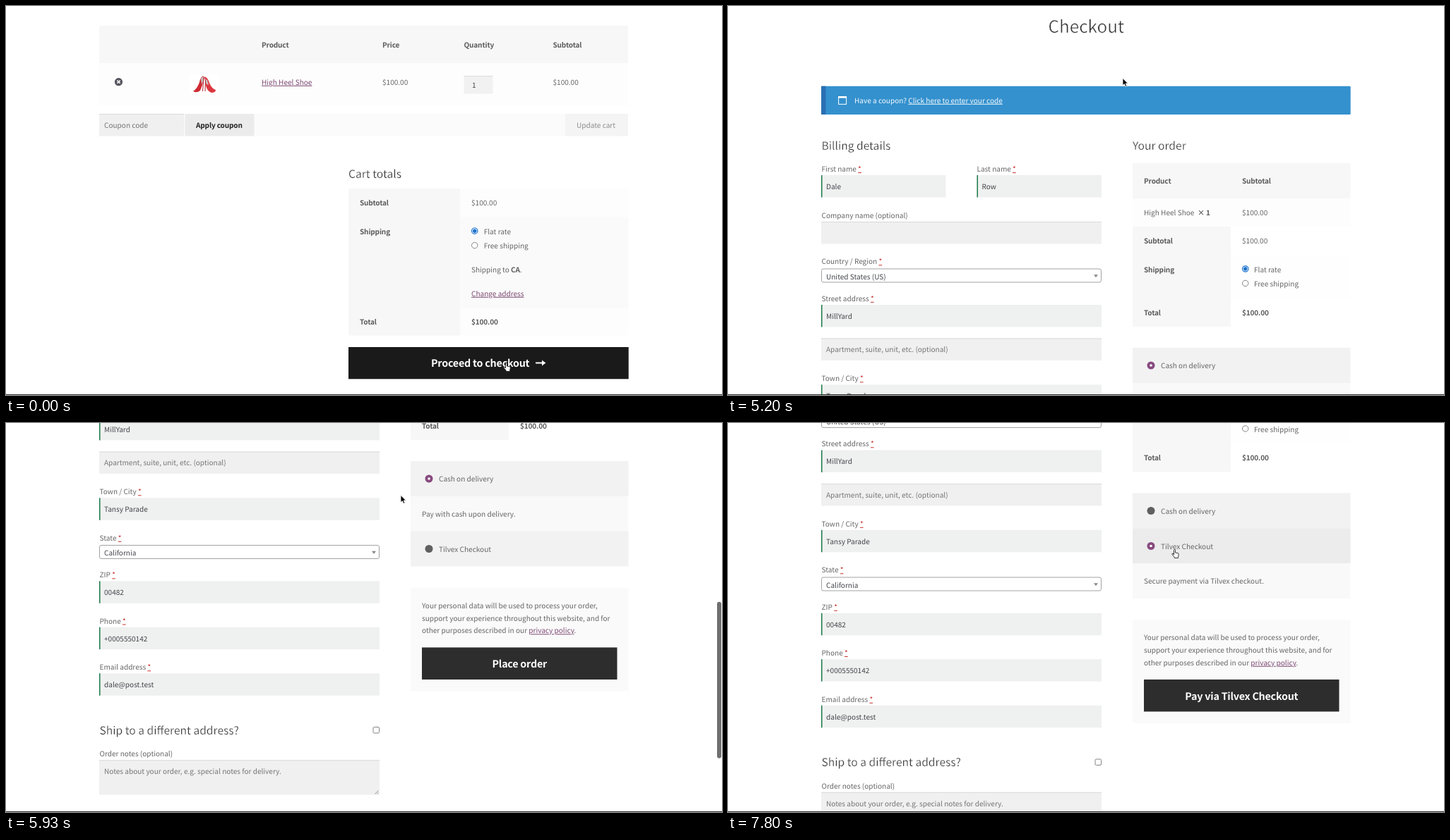
An HTML page that plays this animation: 1014 px wide and 552 px high, repeating every 8 s.

```html
<!DOCTYPE html>
<html lang="en">
<head>
<meta charset="utf-8">
<title>Checkout</title>
<style>
html, body { margin: 0; width: 100%; height: 100%; overflow: hidden; background: #fff; }
#stage { display: block; width: 1014px; height: 552px; }
text {
  font: 400 10.05px "Noto Sans CJK SC", "Noto Sans CJK JP", "Noto Sans CJK TC", "Noto Sans CJK KR", "Noto Sans", sans-serif;
  fill: #666; white-space: pre; text-rendering: geometricPrecision;
}
.b { font-weight: 700; letter-spacing: -.015em; fill: #5c5c5c; }
.dark { fill: #222; }
.off { fill: #8c8c8c; }
.in { fill: #43454b; }
.ph { fill: #757575; }
.white { fill: #f4f9fd; }
.link { fill: #7d4a74; text-decoration: underline; }
.req { fill: #c8322d; text-decoration: underline dotted; }
.h { font-size: 15.6px; fill: #333; stroke: #fff; stroke-width: .3px; }
.title { font-size: 24.3px; fill: #333; stroke: #fff; stroke-width: .5px; text-anchor: middle; }
.btn { font-size: 14.3px; font-weight: 700; letter-spacing: -.015em; fill: #fff; }
.mid { text-anchor: middle; }
</style>
</head>
<body>
<svg id="stage" viewBox="0 0 1014 552"></svg>
<script>
const $ = id => document.getElementById(id);
const set = (id, attrs) => { for (const a in attrs) $(id).setAttribute(a, attrs[a]); };

// Markup helpers; text is placed by the middle of its capitals
const rect = (x, y, w, h, fill, more = '') =>
  `<rect x="${x}" y="${y}" width="${w}" height="${h}" fill="${fill}" ${more}/>`;
const circle = (x, y, r, fill, more = '') => `<circle cx="${x}" cy="${y}" r="${r}" fill="${fill}" ${more}/>`;
const path = (d, fill, more = '') => `<path d="${d}" fill="${fill}" ${more}/>`;
const drop = { h: 5.8, title: 9.4, btn: 5.2 };
const text = (x, y, s, cls = '', more = '') =>
  `<text x="${x}" y="${y + (drop[cls.split(' ')[0]] || 3.8)}" class="${cls}" ${more}>${s}</text>`;
const span = (cls, s) => `<tspan class="${cls}">${s}</tspan>`;

const label = (x, y, s, need = true) => text(x, y, s + (need ? ' ' + span('req', '*') : ''));
const filled = (x, y, w, s) =>
  rect(x, y, w, 31.5, '#eff1f0') + rect(x, y, 1.5, 31.5, '#1b7a4b') + text(x + 7, y + 16, s, 'in');
const blank = (x, y, w, h, s) =>
  rect(x, y, w, h, '#f0f0f0') + rect(x, y, w, 1, '#dadada') + text(x + 7, y + 16, s, 'ph');
const select = (y, s) =>
  rect(132.5, y, 396, 19, '#fff', 'stroke="#a2a2a2" rx="2.5"') + text(139, y + 10.8, s, 'in') +
  path(`M518 ${y + 8.2}h6l-3 4z`, '#888');
const radios = (x, y, gap) =>
  circle(x, y, 4.2, '#fff', 'stroke="#1c72cf" stroke-width="1.2"') + circle(x, y, 2.7, '#1c72cf') +
  circle(x, y + 20.5, 4.2, '#fff', 'stroke="#767676" stroke-width=".9"') +
  text(x + gap, y + .8, 'Flat rate') + text(x + gap, y + 21.3, 'Free shipping');
const option = (id, y, s) =>
  rect(573, y, 308.5, 50, '#f2f2f2', `id="${id}Row"`) + circle(599, y + 25, 5.5, '#606060', `id="${id}Ring"`) +
  circle(599, y + 25, 1.8, '#fff', `id="${id}Dot"`) + text(613, y + 25.2, s);
const fold = (id, s) =>
  `<svg id="${id}" x="573" y="542" width="308.5" height="49.5">${rect(0, 0, 308.5, 50, '#f9f9f9')}${text(16, 25, s)}</svg>`;

const price = '$100.00';

const shoes =
  path('M265 121Q271 117 274 108Q275 102 279 99L281 102Q278 113 275 120Q270 124 265 121Z', '#cf2a33') +
  path('M281 100Q286 102 288 109Q291 117 297 119Q297 123 291 123Q285 121 283 113Z', '#dc3840') +
  path('M276 103L279 100 281 104 277 111ZM282 104L285 105 287 112 284 111Z', '#c9c3c2') +
  path('M280 101L278.5 121M282.5 105L282 121', 'none', 'stroke="#b4232c" stroke-width="1"');

const cart =
  rect(132, 28, 749, 53.5, '#f7f7f7') + rect(132, 81.5, 749, 59.5, '#fdfdfd') + rect(132, 153, 749, 31.5, '#fbfbfb') +
  text(362, 55, 'Product', 'b') + text(533, 55, 'Price', 'b') + text(648.5, 55, 'Quantity', 'b') + text(774.5, 55, 'Subtotal', 'b') +
  circle(159.5, 107.7, 5.6, '#57565f') +
  path('M157.4 105.6l4.2 4.2m0-4.2l-4.2 4.2', 'none', 'stroke="#fff" stroke-width="1.5"') +
  rect(259, 97, 43, 28, '#fff') + shoes +
  text(362, 108, 'High Heel Shoe', 'link') + text(533, 108, price) + text(774.5, 108, price) +
  rect(648.5, 99, 41, 25.5, '#f1f1f1') + rect(648.5, 99, 41, 1, '#dcdcdc') + text(660, 112, '1', 'in') +
  blank(132, 153, 120, 31.5, 'Coupon code') +
  rect(253.5, 153, 98, 31.5, '#ebebeb') + text(269, 169, 'Apply coupon', 'b dark') +
  rect(792, 153, 89, 31.5, '#f4f4f4') + text(808, 169, 'Update cart', 'off') +
  text(485, 238, 'Cart totals', 'h') +
  rect(485, 259, 158.5, 208.5, '#f7f7f7') + rect(643.5, 259, 238, 208.5, '#fdfdfd') + rect(643.5, 300, 238, 128.5, '#fafafa') +
  text(501, 279.5, 'Subtotal', 'b') + text(659, 279.5, price) +
  text(501, 320, 'Shipping', 'b') + radios(663.7, 319.2, 13) +
  text(659, 374, `Shipping to ${span('b', 'CA')}.`) + text(659, 408, 'Change address', 'link') +
  text(501, 448, 'Total', 'b') + text(659, 448, price, 'b') +
  rect(483.7, 482.2, 399.6, 48.6, '#fff', 'id="focus" stroke="#83457a" stroke-width="1.4"') +
  rect(485, 484, 396.7, 45.3, '#1a1a1a') + text(602, 507, 'Proceed to checkout', 'btn') +
  path('M750 505.5h9v-3l5.5 4-5.5 4v-3h-9z', '#fff');

const billing =
  text(132.5, 205, 'Billing details', 'h') +
  label(132.5, 238.3, 'First name') + filled(132, 247, 176.5, 'Dale') +
  label(352.5, 238.3, 'Last name') + filled(352.5, 247, 176.5, 'Row') +
  label(132.5, 304, 'Company name (optional)', false) + blank(132, 313, 397, 31.5, '') +
  label(132.5, 369.5, 'Country / Region') + select(380, 'United States (US)') +
  label(132.5, 422, 'Street address') + filled(132, 431, 397, 'MillYard') +
  blank(132, 478.5, 397, 31.5, 'Apartment, suite, unit, etc. (optional)') +
  label(132.5, 535.5, 'Town / City') + filled(132, 544.3, 397, 'Tansy Parade') +
  label(132.5, 601, 'State') + select(611.5, 'California') +
  label(132.5, 653.5, 'ZIP') + filled(132, 662.3, 397, '00482') +
  label(132.5, 718.7, 'Phone') + filled(132, 727.7, 397, '+0005550142') +
  label(132.5, 784.5, 'Email address') + filled(132, 793.3, 397, 'dale@post.test') +
  text(132.5, 874, 'Ship to a different address?', 'h') +
  rect(520, 869.5, 8.5, 8.5, '#fff', 'stroke="#767676" stroke-width=".9" rx="1.5"') +
  label(132.5, 907.5, 'Order notes (optional)', false) +
  blank(132, 916.3, 397, 49.2, 'Notes about your order, e.g. special notes for delivery.') +
  path('M522.5 964.5l5-5m-2 5l2-2', 'none', 'stroke="#777" stroke-width=".8"');

const order =
  text(573, 205, 'Your order', 'h') +
  rect(573, 230, 308.5, 50, '#f7f7f7') + rect(573, 280, 308.5, 40, '#fdfdfd') +
  rect(573, 320, 139, 142, '#f7f7f7') + rect(712, 360, 169.5, 61.5, '#fefefe') +
  text(589, 255, 'Product', 'b') + text(728, 255, 'Subtotal', 'b') +
  text(589, 300, 'High Heel Shoe') + text(665, 300, '× 1', 'b') + text(728, 300, price) +
  text(589, 340.5, 'Subtotal', 'b') + text(728, 340.5, price) +
  text(589, 381, 'Shipping', 'b') + radios(732.7, 380, 12.3) +
  text(589, 442, 'Total', 'b') + text(728, 442, price, 'b') +
  option('cash', 492, 'Cash on delivery') + fold('cashNote', 'Pay with cash upon delivery.') +
  `<g id="card">${option('card', 591.5, 'Tilvex Checkout')}</g>` + fold('cardNote', 'Secure payment via Tilvex checkout.') +
  rect(573, 672, 308.5, 146.5, '#fafafa') +
  text(589, 697, 'Your personal data will be used to process your order,') +
  text(589, 714.7, 'support your experience throughout this website, and for') +
  text(589, 732.5, `other purposes described in our ${span('link', 'privacy policy')}.`) +
  rect(589, 756.5, 276.5, 45.5, '#2d2d2d') + text(727.3, 779.8, '', 'btn mid', 'id="pay"');

const checkout =
  text(507.3, 36, 'Checkout', 'title') +
  rect(132, 120.7, 749.7, 40.3, '#3491ce', 'rx="1.5"') + rect(132, 120.7, 6.5, 40.3, '#2b70b3') +
  rect(156.6, 135.8, 11, 10.6, 'none', 'stroke="#fff" stroke-width="1"') + rect(156.2, 135, 11.8, 2.6, '#fff') +
  text(179, 141, `Have a coupon? <tspan text-decoration="underline">Click here to enter your code</tspan>`, 'white') +
  billing + order;

$('stage').innerHTML =
  `<g id="cart">${cart}</g>` +
  `<g id="checkout"><g id="page">${checkout}</g>${rect(1007, 84, 6, 222, '#6f6f6f', 'id="bar" rx="3"')}</g>` +
  rect(0, 551, 1014, 1, '#2e2e2e') +
  `<g id="cursor">` +
  path('M0 0V10.2L2.3 8.1 4 11.8 5.8 11 4.2 7.4H7.4Z', '#000', 'id="arrow" stroke="#fff" stroke-width=".8"') +
  path('M-1 7.5V1a1 1 0 0 1 2 0V4.5L4.6 5.2Q6 5.6 5.8 7L5 11V12H-.2V11L-3.6 6.8Q-3.8 5.2-2.4 5.6Z', '#fff',
    'id="hand" stroke="#222" stroke-width=".9" stroke-linejoin="round"') + `</g>`;

// Keys are [tick, ...values], at 15 ticks per second
const mouse = [[0, 708.5, 506.5], [8, 708.5, 506.5], [12, 691, 512], [15, 691, 512], [18, 696, 513],
  [51, 696, 513], [52, 941.5, 241.5], [55, 941.5, 241.5], [60, 770, 176], [66, 559, 102.5], [90, 559, 102.5],
  [98, 629.5, 182], [101, 647, 183], [103, 652, 181.5], [104, 652, 181.5], [107, 632.5, 179.5]];
const scroll = [[77, 0], [78, 7], [79, 40], [80, 100], [81, 165], [82, 230], [83, 292], [84, 346],
  [85, 389], [86, 412], [87, 427], [89, 438], [91, 442]];
const barFade = [[55, 1], [59, 0], [78, 0], [79, 1], [100, 1], [103, 0]];

function at(keys, n) {
  const i = keys.findIndex(k => k[0] > n);
  if (i < 1) return keys.at(i).slice(1);
  const a = keys[i - 1], b = keys[i], p = (n - a[0]) / (b[0] - a[0]);
  return a.slice(1).map((v, j) => v + (b[j + 1] - v) * p);
}
const show = (id, on) => $(id).style.display = on ? '' : 'none';

function draw(ms) {
  const n = Math.floor((ms % 8000 + 4) * .015);
  const second = n >= 52, over = n >= 95, paid = n >= 113;
  show('cart', !second);
  show('checkout', second);
  show('focus', n >= 23);
  show('hand', !second || over);
  show('arrow', second && !over);
  const [x, y] = at(mouse, n);
  set('cursor', { transform: `translate(${x} ${y})` });

  const p = Math.min(1, Math.max(0, (n - 112.4) / 4.4));
  const slide = 49.5 * (.5 - .5 * Math.cos(Math.PI * p));
  const top = at(scroll, n)[0] - slide;
  set('page', { transform: `translate(0 ${-top})` });
  set('bar', { y: 84 + top * .3875, opacity: at(barFade, n)[0] });
  set('cashNote', { height: 49.5 - slide });
  set('card', { transform: `translate(0 ${-slide})` });
  set('cardNote', { y: 641.5 - slide, height: slide });
  set('cardRow', { fill: over ? '#ececec' : '#f2f2f2' });
  set('cashRing', { fill: paid ? '#606060' : '#884a7f' });
  set('cardRing', { fill: paid ? '#884a7f' : '#606060' });
  show('cashDot', !paid);
  show('cardDot', paid);
  $('pay').textContent = paid ? 'Pay via Tilvex Checkout' : 'Place order';
}

const start = performance.now();
function loop() {
  draw(performance.now() - start);
  requestAnimationFrame(loop);
}
loop();
</script>
</body>
</html>
```
